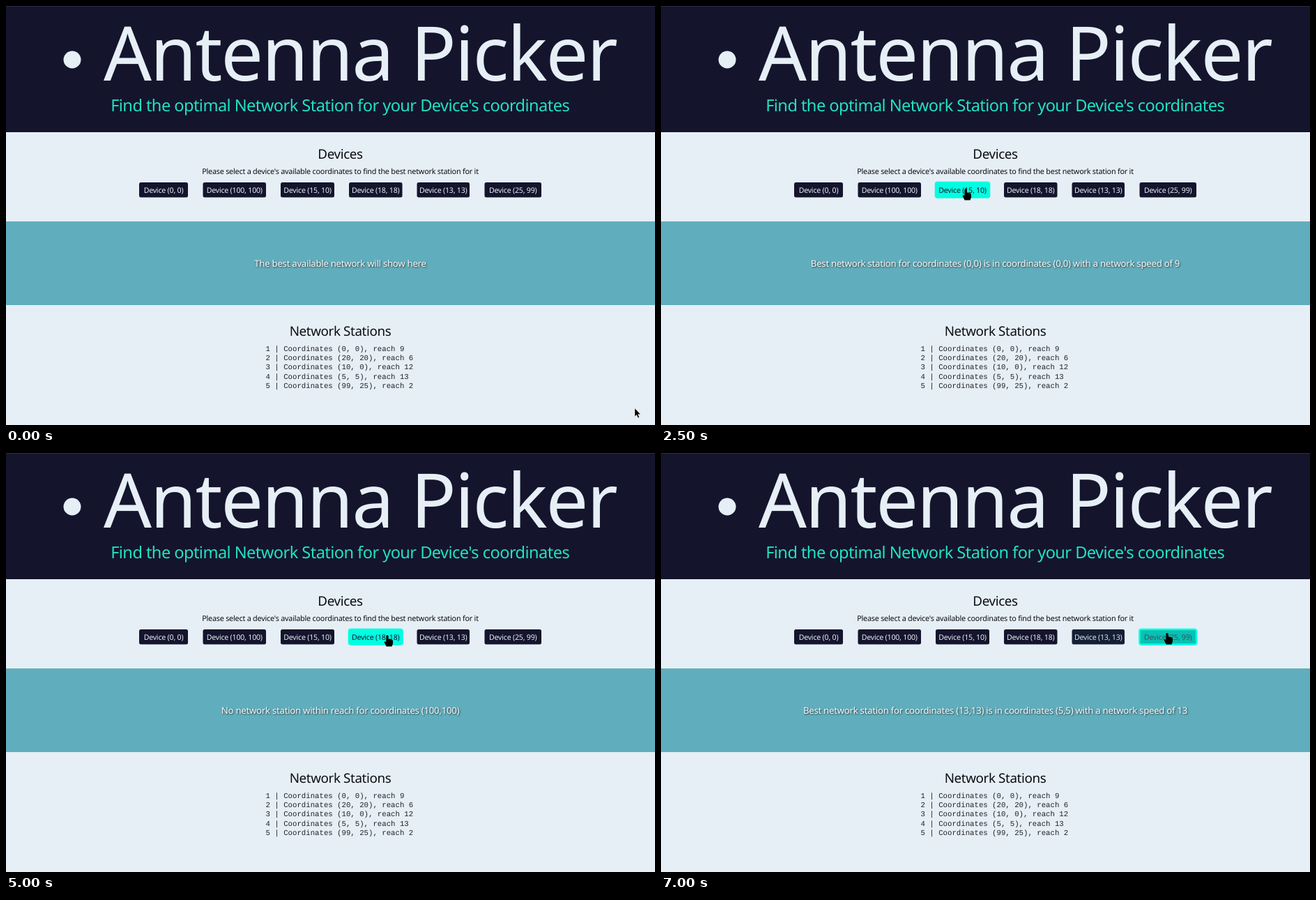
An HTML page for the animation above (7100 ms loop, 931 by 601 pixels).

```html
<!DOCTYPE html>
<html lang="en">
<head>
<meta charset="utf-8">
<title>Antenna Picker</title>
<style>
  html, body { margin: 0; width: 100%; height: 100%; overflow: hidden; background: #e6eff5; }
  svg { display: block; width: 931px; height: 601px; }
  text {
    font-family: "Noto Sans", "Open Sans", sans-serif;
    letter-spacing: -.02em;
    text-rendering: geometricPrecision;
    fill: #0c0c14;
  }
  .mid { text-anchor: middle; }
  .title { font-size: 108px; fill: #e6eff5; }
  .lead { font-size: 23.6px; letter-spacing: -.0236em; fill: #20e3c2; }
  .head { font-size: 18.8px; }
  .note { font-size: 10.8px; }
  .label { font-size: 10.6px; }
  .result { font-size: 13.2px; fill: #f4f8fa; filter: drop-shadow(1px 1px 1px #333); }
  .row { font: 10.7px "Liberation Mono", monospace; letter-spacing: 0; fill: #20222a; }
</style>
</head>
<body>
<svg id="stage" viewBox="0 0 931 601">
  <rect width="931" height="601" fill="#e6eff5"/>
  <rect width="931" height="181" fill="#15142d"/>
  <rect width="931" height="1" fill="#2d2c44"/>
  <circle cx="95" cy="77" r="12.5" fill="#e6eff5"/>
  <text class="title" x="140" y="107">Antenna Picker</text>
  <text class="lead mid" x="479.2" y="151">Find the optimal Network Station for your Device's coordinates</text>

  <text class="head mid" x="479.5" y="219">Devices</text>
  <text class="note mid" x="479.5" y="241">Please select a device's available coordinates to find the best network station for it</text>
  <g id="buttons"></g>

  <rect y="309" width="931" height="120" fill="#60aebd"/>
  <text id="result" class="result mid" x="479.5" y="374"></text>

  <text class="head mid" x="479.5" y="473">Network Stations</text>
  <g id="rows"></g>

  <g id="cursor">
    <path id="arrow" d="M0 0V11.8L2.6 9.4L4.6 13.8L6.5 13L4.6 8.7H8.2Z" stroke="#fff" stroke-width=".4"/>
    <path id="hand" d="M-1.6 1.2Q0-.8 1.6 1.2V5.4Q7.6 5.4 8 8.5V12.5L6.6 16.6H-1.4L-4.4 10.6Q-4 8.2-1.6 10Z"/>
  </g>
</svg>
<script>
const LOOP = 7100, STEP = 100, FADE = 150;
const TOP = 253, HEIGHT = 21.5;
const DARK = [21, 20, 45], LIGHT = [230, 239, 245], CYAN = [0, 255, 225];

// left edge, width, device coordinates
const devices = [
  [191, 70, "0, 0"], [282.5, 90.5, "100, 100"], [394, 77, "15, 10"],
  [492, 76.5, "18, 18"], [589.5, 75.5, "13, 13"], [686.5, 81.5, "25, 99"]
];
// x, y, reach
const stations = [[0, 0, 9], [20, 20, 6], [10, 0, 12], [5, 5, 13], [99, 25, 2]];

// time, x, y of the pointer tip
const path = [
  [100, 902, 577], [1200, 258, 264], [1900, 258, 264], [2400, 437, 262],
  [2700, 437, 262], [2850, 437, 284], [2920, 437, 281], [3100, 438, 267],
  [3250, 438, 267], [3600, 354, 261], [4300, 354, 261], [4800, 547, 261],
  [5900, 547, 261], [6230, 564, 262], [6300, 632, 262], [6785, 632, 262],
  [7000, 726, 258]
];

const best = (from, to, speed) =>
  `Best network station for coordinates (${from}) is in coordinates (${to}) with a network speed of ${speed}`;
const messages = [
  [0, "The best available network will show here"],
  [1400, best("0,0", "0,0", 9)],
  [2600, best("15,10", "5,5", 13)],
  [3900, "No network station within reach for coordinates (100,100)"],
  [5200, best("18,18", "20,20", 6)],
  [6600, best("13,13", "5,5", 13)]
];

const $ = id => document.getElementById(id);

function add(parent, tag, attrs, text = "") {
  const el = document.createElementNS("http://www.w3.org/2000/svg", tag);
  for (const key in attrs) el.setAttribute(key, attrs[key]);
  el.textContent = text;
  return parent.appendChild(el);
}

const buttons = devices.map(([x, width, name]) => ({
  x, width,
  box: add($("buttons"), "rect", { x, y: TOP, width, height: HEIGHT, rx: 2.5, "stroke-width": 2.6 }),
  label: add($("buttons"), "text", { class: "label mid", x: x + width / 2, y: 268 }, `Device (${name})`)
}));

stations.forEach(([x, y, reach], i) =>
  add($("rows"), "text", { class: "row", x: 372.5, y: 494.5 + 13.4 * i },
    `${i + 1} | Coordinates (${x}, ${y}), reach ${reach}`));

const smooth = u => u * u * (3 - 2 * u);
const mix = (a, b, u) => `rgb(${a.map((v, i) => Math.round(v + (b[i] - v) * u))})`;

function pointer(t) {
  const next = path.findIndex(p => p[0] > t);
  if (next === 0) return path[0].slice(1);
  if (next < 0) return path[path.length - 1].slice(1);
  const [t0, x0, y0] = path[next - 1], [t1, x1, y1] = path[next];
  const u = smooth((t - t0) / (t1 - t0));
  return [x0 + (x1 - x0) * u, y0 + (y1 - y0) * u];
}

function hovers(b, t) {
  const [x, y] = pointer(t);
  return x >= b.x && x <= b.x + b.width && y >= TOP && y <= TOP + HEIGHT;
}

// The share of the last FADE ms spent hovering gives the fade level.
function level(b, t) {
  let hits = 0;
  for (let s = 0; s < FADE; s += 5) hits += hovers(b, t - s);
  return smooth(hits * 5 / FADE);
}

function draw(t) {
  let over = false;
  for (const b of buttons) {
    const hot = hovers(b, t), u = level(b, t);
    over = over || hot;
    b.box.style.fill = mix(DARK, CYAN, u);
    b.box.style.stroke = hot ? `rgb(${CYAN})` : "none";
    b.label.style.fill = mix(LIGHT, DARK, u);
  }
  const message = messages.filter(m => m[0] <= t).pop()[1];
  if ($("result").textContent !== message) $("result").textContent = message;
  $("cursor").setAttribute("transform", `translate(${pointer(t)})`);
  $("arrow").style.display = over ? "none" : "";
  $("hand").style.display = over ? "" : "none";
}

const start = performance.now();
function tick() {
  const t = (performance.now() - start) % LOOP;
  draw(Math.floor(t / STEP) * STEP);
  requestAnimationFrame(tick);
}
tick();
</script>
</body>
</html>
```
